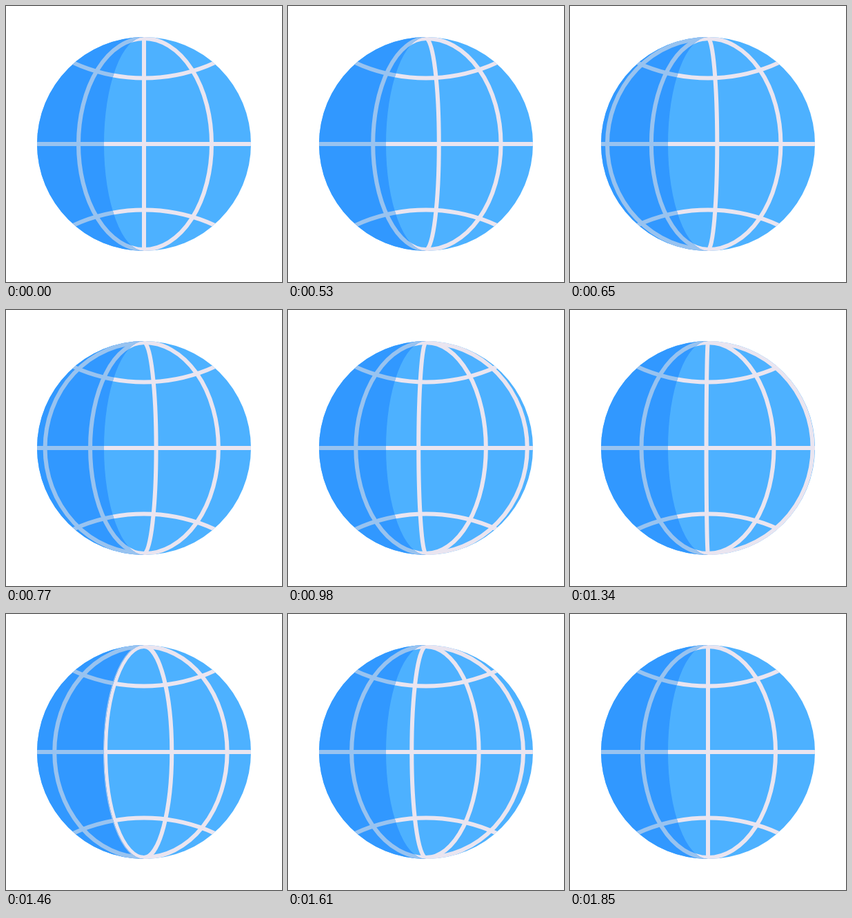
Animation of 400x400 px, one loop 1.94 s. Source, as an HTML page with a canvas:

```html
<!DOCTYPE html>
<html lang="en">
<head>
<meta charset="utf-8">
<title>Spinning globe</title>
<style>
  html, body { margin: 0; width: 100%; height: 100%; overflow: hidden; background: #fff; }
  canvas { display: block; }
</style>
</head>
<body>
<canvas id="stage" width="400" height="400"></canvas>
<script>
const ctx = document.getElementById('stage').getContext('2d');
const LOOP = 1940, START = 500, STEP = 30, STEPS = 45, TURNS = 7;
const C = 200, R = 155, POLE = 153;
// Equator offsets a meridian passes through, one interval per turn
const STOPS = [-154, -95, 0, 98, 153];

const bezier = (a, b, s) => 3 * (1 - s) ** 2 * s * a + 3 * (1 - s) * s * s * b + s ** 3;

function ease(t) {
  let lo = 0, hi = 1;
  for (let i = 0; i < 30; i++) {
    const mid = (lo + hi) / 2;
    if (bezier(0.188, 0.475, mid) < t) lo = mid; else hi = mid;
  }
  return bezier(0.215, 1, lo);
}

function meridian(offset) {
  ctx.beginPath();
  ctx.ellipse(C, C, Math.abs(offset), POLE, 0, -Math.PI / 2, Math.PI / 2, offset < 0);
  ctx.stroke();
}

function parallel(side) {
  ctx.beginPath();
  ctx.arc(C, C + side * 344, 248.5, 0, 2 * Math.PI);
  ctx.stroke();
}

function paint(fill, line, meridians) {
  ctx.fillStyle = fill;
  ctx.fillRect(0, 0, 400, 400);
  ctx.strokeStyle = line;
  ctx.lineWidth = 6;
  ctx.beginPath();
  ctx.moveTo(C - R, C);
  ctx.lineTo(C + R, C);
  ctx.stroke();
  parallel(-1);
  parallel(1);
  meridians.forEach(meridian);
}

function draw(ms) {
  const step = Math.min(STEPS, Math.max(0, Math.floor((ms - START) / STEP))) % STEPS;
  const part = step ? TURNS * ease(step / STEPS) % 1 : 0;
  const meridians = STOPS.slice(0, -1).map((x, i) => x + (STOPS[i + 1] - x) * part);
  if (step < 2) meridians.shift(); // nothing enters from the left edge yet

  ctx.clearRect(0, 0, 400, 400);
  ctx.save();
  ctx.beginPath();
  ctx.arc(C, C, R, 0, 2 * Math.PI);
  ctx.clip();
  paint('#4db1ff', '#eae5f0', meridians);

  // Shaded crescent on the left
  ctx.beginPath();
  ctx.moveTo(C, 0);
  ctx.lineTo(C, C - R);
  ctx.ellipse(C, C, 58, R, 0, -Math.PI / 2, Math.PI / 2, true);
  ctx.lineTo(C, 400);
  ctx.lineTo(0, 400);
  ctx.lineTo(0, 0);
  ctx.clip();
  paint('#3198ff', '#98c3f0', meridians);
  ctx.restore();
}

const origin = performance.now();
function tick() {
  draw((performance.now() - origin) % LOOP);
  requestAnimationFrame(tick);
}
tick();
</script>
</body>
</html>
```
